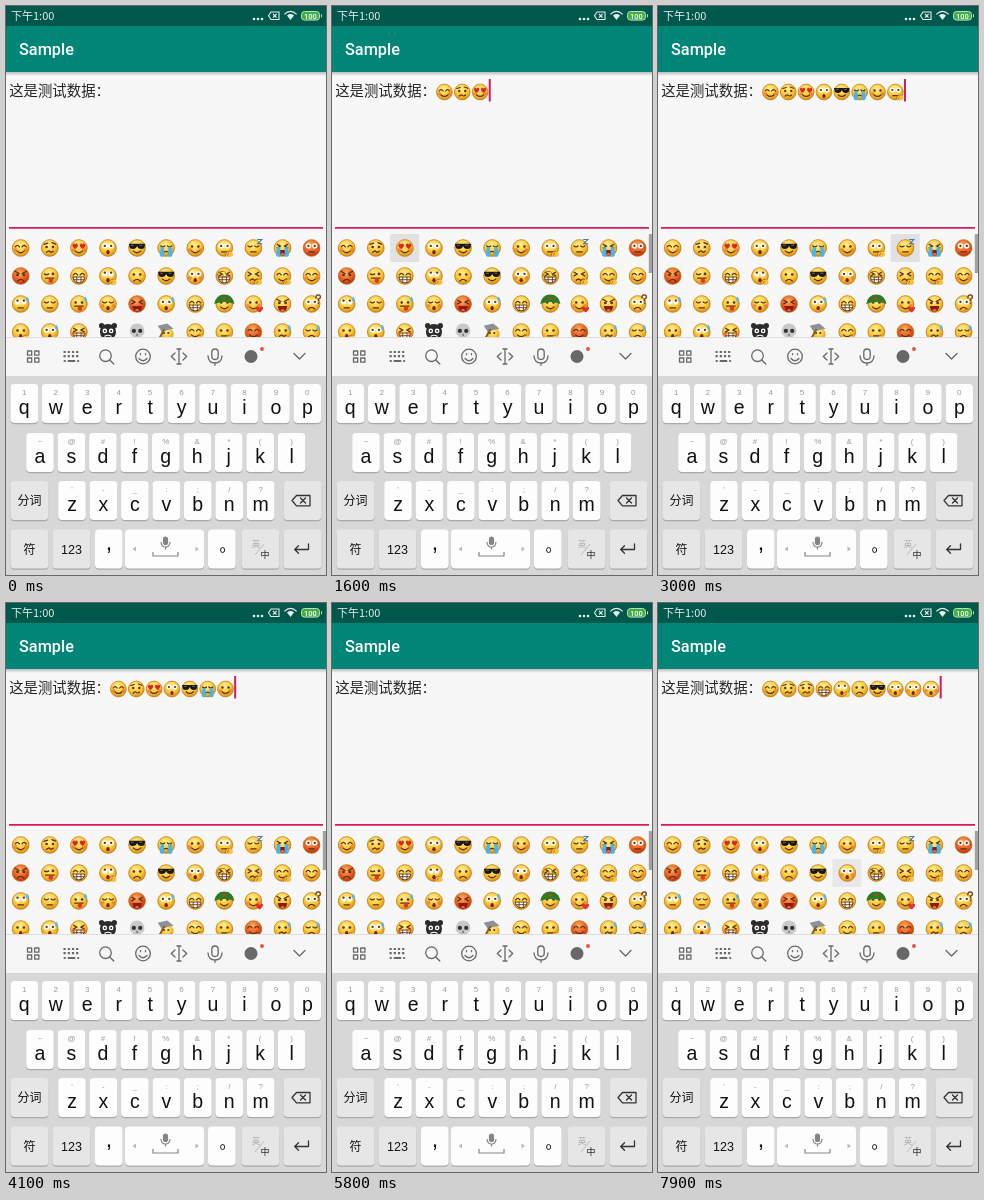
An HTML page that plays this animation: 320 px wide and 569 px high, repeating every 8000 ms.

```html
<!DOCTYPE html>
<html lang="zh-CN">
<head>
<meta charset="utf-8">
<title>Emoji input</title>
<style>
html, body { margin: 0; width: 100%; height: 100%; overflow: hidden; background: #f7f7f7; }
svg { display: block; width: 100%; height: 100%; }
text { font-family: "Noto Sans CJK SC", "Noto Sans CJK", sans-serif; }
.latin { font-family: Roboto, sans-serif; }
.key { font-family: "Liberation Sans", Arial, sans-serif; }
.mid { text-anchor: middle; }
.icon { fill: none; stroke: #686868; stroke-width: 1.3; stroke-linecap: round; stroke-linejoin: round; }
</style>
</head>
<body>
<svg id="stage" viewBox="0 0 320 569" preserveAspectRatio="none">
  <defs>
    <radialGradient id="gold" cx=".45" cy=".32" r=".68">
      <stop offset="0" stop-color="#fff09a"/><stop offset=".55" stop-color="#fbcb3c"/><stop offset="1" stop-color="#d98d14"/>
    </radialGradient>
    <radialGradient id="red" cx=".45" cy=".32" r=".68">
      <stop offset="0" stop-color="#ffb060"/><stop offset=".55" stop-color="#ee6428"/><stop offset="1" stop-color="#b5300e"/>
    </radialGradient>
    <linearGradient id="shade" x2="0" y2="1">
      <stop offset="0" stop-color="#000" stop-opacity=".24"/><stop offset="1" stop-color="#000" stop-opacity="0"/>
    </linearGradient>
    <clipPath id="panel"><path d="M0 228H320V331.5H0z"/></clipPath>
    <g id="faces"></g>
  </defs>

  <path fill="#f7f7f7" d="M0 0H320V569H0z"/>
  <path fill="#008577" d="M0 0H320V66H0z"/>
  <path fill="#00574b" d="M0 0H320V20H0z"/>
  <path fill="url(#shade)" d="M0 66H320V70H0z"/>
  <text x="5" y="14" font-size="11" fill="#e3eeec">下午1:00</text>
  <g fill="#e3eeec">
    <circle cx="248" cy="13" r="1.3"/><circle cx="252" cy="13" r="1.3"/><circle cx="256" cy="13" r="1.3"/>
    <path d="M281 9.5Q284.500 6.600 288 9.500L284.500 14z"/>
  </g>
  <g fill="none" stroke="#e3eeec" stroke-width="1.100">
    <path d="M265 6H273V13.500H265L262.500 9.700zM267 8l3.600 3.600M270.600 8l-3.600 3.600M278.300 8.400Q284.500 2.500 290.700 8.400"/>
  </g>
  <rect x="295.500" y="5.500" width="18" height="8.600" rx="3" fill="#3fae49" stroke="#b9e2b5"/>
  <path d="M315.500 8.300v3" stroke="#b9e2b5"/>
  <text class="latin mid" x="304.500" y="12.500" font-size="7.500" font-weight="500" fill="#fff">100</text>
  <text class="latin" x="13" y="49" font-size="16.300" font-weight="500" fill="#fff">Sample</text>

  <text x="3.200" y="89.500" font-size="14.400" fill="#252525">这是测试数据：</text>
  <g id="line"></g>
  <rect id="caret" y="73" width="2" height="22.500" fill="#d81b60"/>
  <path fill="#d81b60" d="M3 221H317V222.700H3z"/>

  <g clip-path="url(#panel)">
    <rect id="press" width="29" height="28" fill="#e1e1e1"/>
    <g id="grid"></g>
    <path id="bar" fill="#a3a3a3" d="M316.800 228H320V267H316.800z"/>
  </g>

  <path fill="#f6f6f6" d="M0 332H320V370H0z"/>
  <path stroke="#dedede" d="M0 331.500H320"/>
  <g class="icon">
    <path d="M21.500 345h4.200v4.200h-4.200zM28.700 345h4.200v4.200h-4.200zM21.500 352h4.200v4.200h-4.200zM28.700 352h4.200v4.200h-4.200z"/>
    <path stroke-width="2.200" stroke-dasharray="2.200 2" stroke-linecap="butt" d="M57.500 346H73M57.500 350.200H73"/>
    <path stroke-width="2" d="M58.500 355H59M62.500 355H68.500M72 355h.3"/>
    <circle cx="99.500" cy="349.700" r="5.800"/><path d="M103.800 354l4 4"/>
    <circle cx="137" cy="350.500" r="7.300"/><path d="M133 352.500q4 4.500 8 0M134.500 347.700v1M139.500 347.700v1"/>
    <path d="M173 343v15M171 343h4M171 358h4M169 347l-3.700 3.500 3.700 3.500M177 347l3.700 3.500-3.700 3.500"/>
    <rect x="205.800" y="343" width="6.400" height="10.500" rx="3.200"/>
    <path d="M202 350q.500 7 7 7t7-7M209 357v2.300M288 347.500l5.500 5.500 5.500-5.500"/>
  </g>
  <circle cx="245" cy="350.500" r="6.500" fill="#686868"/>
  <circle cx="256" cy="343" r="1.900" fill="#f04a30"/>

  <path fill="#d7d7d7" d="M0 370H320V569H0z"/>
  <g id="keys"></g>
  <g class="icon" stroke="#333" style="stroke:#333">
    <path d="M286 494.500l4.500-5H304v10.300H290.500zM294.500 492l5 5M299.500 492l-5 5"/>
    <path d="M302.500 538v5.500H289M292.500 539.800l-3.800 3.700 3.800 3.700"/>
  </g>
  <g fill="none" stroke="#858585" stroke-width="1.200">
    <rect x="157.500" y="531" width="4" height="7.500" rx="2" fill="#858585"/>
    <path d="M155 536q.300 5 4.500 5t4.500-5M159.500 541v2.500M147 546v4H172v-4"/>
  </g>
  <path fill="#bbb" d="M130 540.500v5l-3.500-2.500zM189.500 540.500v5l3.500-2.500z"/>
  <path stroke="#bbb" d="M249 549l9-11"/>
  <text class="mid" x="250" y="541" font-size="8.500" fill="#aaa">英</text>
  <text class="mid" x="259" y="552" font-size="9" fill="#222">中</text>
</svg>
<script>
const $ = id => document.getElementById(id);
const INK = '#5b300f';
const stroke = (d, color = INK, w = 1.2) =>
  `<path d="${d}" fill="none" stroke="${color}" stroke-width="${w}" stroke-linecap="round"/>`;
const fill = (d, color = INK) => `<path d="${d}" fill="${color}"/>`;
const dot = (x, y, r, color = INK) => `<circle cx="${x}" cy="${y}" r="${r}" fill="${color}"/>`;
const pair = (y, r, color, dx = 3) => dot(-dx, y, r, color) + dot(dx, y, r, color);

const EYES = {
  d: pair(-1.5, 1.2),
  w: pair(-2, 2.5, '#fff') + pair(-2, 1.1),
  u: pair(-2, 2.4, '#fff') + pair(-3.2, 1.1),
  c: stroke('M-5.2-1q2-2.800 4 0M1.200-1q2-2.800 4 0'),
  l: stroke('M-5.200-2q2 2 4 0M1.200-2q2 2 4 0'),
  b: pair(-1, 1.2) + stroke('M-5.500-3.500l3.500-1M2-5l3.500 1.300'),
  a: pair(-1, 1.3) + stroke('M-5.500-4.500l4 2.200M5.500-4.500l-4 2.200'),
  x: stroke('M-5-3.500l3 1.700-3 1.700M5-3.500l-3 1.700 3 1.700'),
  k: stroke('M-5-2q2 1.500 4 0') + dot(3, -2, 1.3),
  s: fill('M-7.800-4H7.800L6.800 0Q4 2 1 0L0-2-1 0Q-4 2-6.800 0z', '#1d1712') + stroke('M-5.500-2.600h2M2.500-2.600h2', '#777', .8),
  h: fill('M-3.500 1Q-7.500-2-5.500-4-4-5-3.500-3-3-5-1.500-4 .5-2-3.500 1zM3.500 1Q-.5-2 1.500-4 3-5 3.500-3 4-5 5.500-4 7.500-2 3.500 1z', '#e0261b')
};
const MOUTHS = {
  s: stroke('M-3.600 2.700q3.600 3.500 7.200 0'),
  f: stroke('M-3 4.700q3-3 6 0'),
  n: stroke('M-2.500 3.700h5'),
  p: stroke('M-3 4q2-2 3.200-.6t3-.4'),
  o: `<ellipse cy="4" rx="1.600" ry="2" fill="#7a2410"/>`,
  O: fill('M-4.500 1.800H4.500Q4 7 0 7T-4.500 1.800z', '#8d1b12') + fill('M-2 5.800q2-2 4 0-2 1.600-4 0z', '#f26a55'),
  g: fill('M-5.500 1H5.500Q5 6.400 0 6.400T-5.500 1z', '#fff') + stroke('M-5.500 1H5.500Q5 6.400 0 6.400T-5.500 1zM-5 3.500H5M-2 1v5M2 1v5', INK, .8),
  t: stroke('M-4 2h8') + fill('M-1 2.300H3V5q-2 3-4 0z', '#e2372b')
};
const EXTRAS = {
  b: `<g opacity=".6">${pair(1.8, 1.8, '#f2633a', 5)}</g>`,
  t: fill('M-5-1h3v9q-3 1-4-1zM2-1h3l1 8q-1 2-4 1z', '#45b5ee'),
  w: fill('M6-7q3.500 4 .5 5-3-1-.5-5z', '#58b9ea'),
  m: fill('M1 7q0-4 4-4 4 1 3 4-3 3-7 0z', '#f6c141') + stroke('M1 7q0-4 4-4M3 7l1-2', '#a9650d', .8),
  g: fill('M-9.500 0Q-8-9 0-9T9.500 0Q0-4-9.500 0z', '#2f7a25') + dot(0, -5.500, 1.2, '#d9372c'),
  h: fill('M6 8Q1 5 3 3 5 2 6 4 7 2 9 3 10 5 6 8z', '#e4312b'),
  q: stroke('M4-6q0-3 3-2.500 3 2-.5 4V-3M6.500-.9v.1', '#7d4a18', 1.4),
  z: stroke('M4-8h4l-4 4h4', '#3d78b8', 1),
  r: stroke('M-7 0q2-6 7-4 4 3 1 5-4 1-2-2', '#a8660e', .9)
};
const SPECIAL = {
  K: dot(0, 0, 7.6, '#2e2b2c') + dot(-6, -6, 2.5, '#2e2b2c') + dot(6, -6, 2.5, '#2e2b2c') +
     pair(-1, 2.2, '#fff') + pair(-1, .9, '#222') + stroke('M-3 4q3-2 6 0', '#fff', 1),
  S: fill('M-7-1Q-6-8 0-8T7-1Q7 3 4 3.500V7H-4V3.500Q-7 3-7-1z', '#c9c9c5') + pair(-1, 2, '#333') +
     stroke('M0 2v1.500M-1.500 5v2M1.500 5v2', '#444', .9),
  H: dot(1, 2, 6, 'url(#gold)') + pair(1, 1, INK, 2) + fill('M-8-6l9-2 6 5-6 1-5 2z', '#8c9297') +
     stroke('M-7 7L-2-2', '#86591f', 1.8)
};

// Each code: eyes, mouth, extras; R makes the face red.
const CODES = (
  'csb bp hsRb wo ss lft dsb wnm lnz xOt wnRb ' +
  'afR kt cg uom df ss wob xgr xpm csm csb ' +
  'unw ln dtw lob xOR wow cg dsg dsbh aO wfq ' +
  'dom wow xgb K S H csm dnm csR dpw lfw').split(' ');

const COLS = 11, PITCH = 29.09, TOP = 228, ROW = 28;

function face(code) {
  if (SPECIAL[code]) return SPECIAL[code];
  const strong = code.includes('R') && code[0] !== 'h';
  const extras = [...code.slice(2)].map(c => EXTRAS[c] || '').join('');
  return `<circle r="7.900" fill="url(#${strong ? 'red' : 'gold'})" stroke="#b9730f" stroke-width=".7"/>` +
    EYES[code[0]] + MOUTHS[code[1]] + extras;
}
const cellX = i => (i % COLS) * PITCH;
const cellY = i => TOP + Math.floor(i / COLS) * ROW;

$('faces').innerHTML = CODES.map((c, i) => `<g id="e${i}">${face(c)}</g>`).join('');
$('grid').innerHTML = CODES.map((c, i) =>
  `<use href="#e${i}" transform="translate(${cellX(i) + 14.7} ${cellY(i) + 14}) scale(1.060)"/>`).join('');
$('line').innerHTML = Array.from({ length: 10 }, (_, i) =>
  `<use transform="translate(${112.4 + i * 17.85} 86)"/>`).join('');
const slots = [...$('line').children];

function key(x, y, w, color = '#fdfdfd', id = '') {
  return `<rect x="${x}" y="${y + 1.2}" width="${w}" height="39" rx="4" fill="#a9a9a9"/>` +
    `<rect ${id && `id="${id}"`} x="${x}" y="${y}" width="${w}" height="39" rx="4" fill="${color}"/>`;
}
const label = (s, x, y, size, cls = 'key', color = '#111') =>
  `<text class="mid ${cls}" x="${x}" y="${y}" font-size="${size}" fill="${color}">${s}</text>`;

function letters(chars, hints, x0, y) {
  return [...chars].map((c, i) => {
    const x = x0 + i * 31.45;
    return key(x - 13.8, y, 27.6) + label(c, x, y + 29.5, 19.5) +
      label(hints[i] === '&' ? '&amp;' : hints[i], x, y + 11, 8, 'key', '#999');
  }).join('');
}
const GREY = '#e6e6e6';
$('keys').innerHTML =
  letters('qwertyuiop', '1234567890', 18.3, 378) +
  letters('asdfghjkl', '~@#!%&*()', 34, 427) +
  letters('zxcvbnm', "'-_:;/?", 66, 475) +
  key(4.5, 475, 38, GREY) + label('分词', 23.5, 499, 12, '') +
  key(277.5, 475, 38, GREY, 'back') +
  key(4.5, 523.5, 38, GREY) + label('符', 23.5, 547.5, 12, '') +
  key(46.5, 523.5, 38, GREY) + label('123', 65.5, 547.5, 12.5) +
  key(89, 523.5, 27.6) + label(',', 103, 543.5, 23) +
  key(119, 523.5, 79) +
  key(202, 523.5, 27.6) + '<text x="213.500" y="545" font-size="16" fill="#111">。</text>' +
  key(235.5, 523.5, 38, GREY) + key(277.5, 523.5, 38, GREY);

const LOOP = 8000, DEL = -1;
const taps = (times, picks) => times.map((t, i) => [t, picks[i]]);
const dels = times => times.map(t => [t, DEL]);
const EVENTS = [
  ...taps([1000, 1300, 1550, 1750, 1950, 2250, 2500, 2750, 3050, 3350], [0, 1, 2, 3, 4, 5, 6, 7, 8, 9]),
  ...dels([3650, 3850, 4050, 4300, 4400, 4500, 4600, 4700, 4800, 4850]),
  ...taps([5950, 6100, 6250, 6400, 6550, 6850, 7050, 7300, 7600, 7800], [0, 1, 1, 13, 14, 15, 16, 17, 17, 17])
];

function draw(t) {
  const typed = [];
  let last = 500, cell = -1, glow = 0, back = false;
  for (const [at, what] of EVENTS) {
    const dt = t - at;
    if (dt >= 0) {
      last = at;
      what === DEL ? typed.pop() : typed.push(what);
    }
    if (what === DEL) back = back || (dt >= -50 && dt < 50);
    else if (dt >= -80 && dt < 140) {
      cell = what;
      glow = dt < 80 ? 1 : (140 - dt) / 60;
    }
  }
  slots.forEach((s, i) => {
    const on = i < typed.length;
    s.style.display = on ? '' : 'none';
    if (on) s.setAttribute('href', '#e' + typed[i]);
  });
  $('caret').setAttribute('x', 103.2 + typed.length * 17.85);
  $('caret').style.opacity = t >= 500 && (t - last) % 1000 < 500 ? 1 : 0;

  $('press').style.opacity = cell < 0 ? 0 : glow;
  if (cell >= 0) {
    $('press').setAttribute('x', cellX(cell));
    $('press').setAttribute('y', cellY(cell));
  }
  $('back').setAttribute('fill', back ? '#c2c2c2' : GREY);
  const fade = t < 900 ? 0 : t < 4300 ? 1 : t < 5800 ? Math.max(0, 1 - (t - 4300) / 300) : 1;
  $('bar').style.opacity = fade;
}

function frame() {
  draw(performance.now() % LOOP);
  requestAnimationFrame(frame);
}
frame();
</script>
</body>
</html>
```
